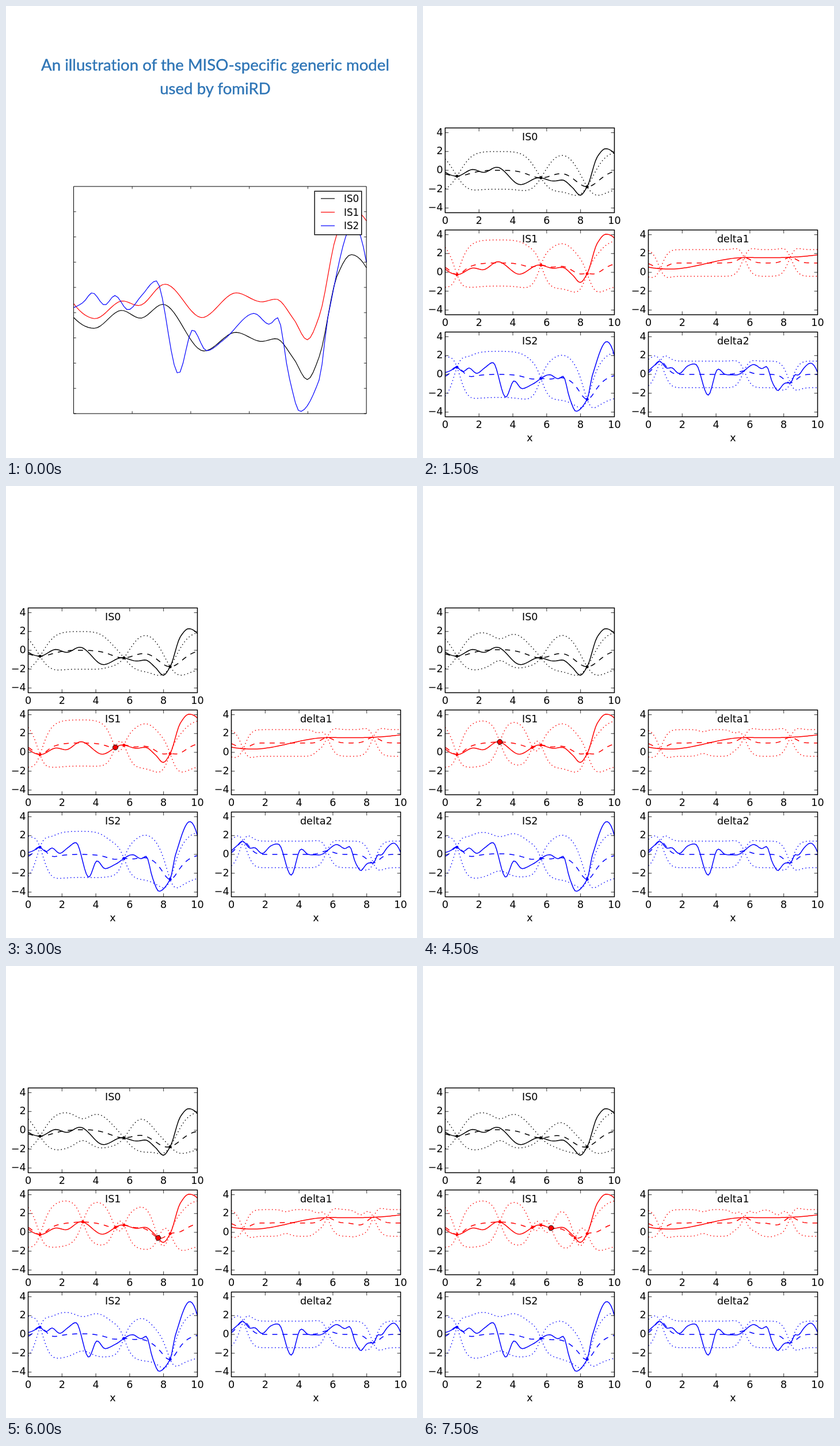
An HTML page that plays this animation: 714x784 px, repeating every 8 s.

```html
<!DOCTYPE html>
<html lang="en">
<head>
<meta charset="utf-8">
<title>Multi-source model</title>
<style>
  html, body { margin: 0; width: 100%; height: 100%; overflow: hidden; background: #fff; }
  svg { display: block; width: 100vw; height: 100vh; }
  text { font: 17.6px "DejaVu Sans", sans-serif; }
  .title { font: 27.65px Lato, sans-serif; font-variant-ligatures: none; fill: #2e75b6; stroke: #2e75b6; stroke-width: .4px; }
  .legend { font-size: 16.8px; }
</style>
</head>
<body>
<svg id="stage" viewBox="0 0 714 784"></svg>
<script>
const LOOP = 8000, STEP = 1500, SAMPLES = 100;
const COLORS = ['#000', '#f00', '#00f'];
const xs = Array.from({ length: SAMPLES }, (_, i) => i * 10 / (SAMPLES - 1));

// Curve eased through x,y key points: flat at turning points, parabolic at the ends.
function eased(...p) {
  const n = p.length / 2, x = i => p[2 * i], y = i => p[2 * i + 1];
  const sec = i => (y(i + 1) - y(i)) / (x(i + 1) - x(i));
  const slope = i => {
    if (i === 0) return 2 * sec(0) - slope(1);
    if (i === n - 1) return 2 * sec(n - 2) - slope(n - 2);
    const a = sec(i - 1), b = sec(i);
    return a * b > 0 ? 2 * a * b / (a + b) : 0;
  };
  return v => {
    let i = 0;
    while (i < n - 2 && v > x(i + 1)) i++;
    const h = x(i + 1) - x(i), t = (v - x(i)) / h, u = 1 - t;
    return u * u * (1 + 2 * t) * y(i) + t * t * (3 - 2 * t) * y(i + 1)
      + h * t * u * (u * slope(i) - t * slope(i + 1));
  };
}

const truth0 = eased(0,-.19, .7,-.62, 1.64,.09, 2.28,-.22, 3.05,.33, 4.45,-1.52, 5.54,-.78,
  6.42,-1.14, 6.91,-1.03, 7.52,-1.83, 7.98,-2.65, 8.39,-1.74, 9,1.46, 9.48,2.3, 10,1.78);
const truth2 = eased(0,.2, .33,.41, .64,.79, 1.06,.3, 1.41,.68, 1.86,.11, 2.33,.69, 2.82,1.26,
  3.58,-2.42, 4.07,-.68, 4.54,-1.51, 5.14,-1.06, 6.17,-.03, 6.68,-.46, 6.97,-.2, 7.36,-2.55,
  7.73,-3.92, 8.39,-2.65, 8.7,-.09, 9.55,3.49, 10,2);
const shift1 = eased(0,.55, 1.25,.345, 5.7,1.57, 7.5,1.565, 10,1.86);

const truth = [truth0, x => truth0(x) + shift1(x), truth2];
const shift = [null, shift1, x => truth2(x) - truth0(x)];

// Axes map data units to stage pixels.
function axes(left, top, width, height, min, max) {
  return {
    left, top, width, height, min, max,
    X: x => left + x / 10 * width,
    Y: y => top + (max - y) / (max - min) * height
  };
}

const big = axes(117.5, 313, 508.6, 394, -4, 5);
const panel = (left, top) => axes(left, top, 294, 147, -4.5, 4.5);

// Gaussian process: a shared base plus an independent shift for each source.
const kBase = (a, b) => Math.exp(-((a - b) ** 2));
const kShift = (a, b) => .5 * Math.exp(-4 * (a - b) ** 2);
const priorMean = [0, 1, 0];
const dot = (a, b) => a.reduce((s, v, i) => s + v * b[i], 0);

function invert(m) {
  const n = m.length;
  const a = m.map((r, i) => [...r, ...r.map((_, j) => +(i === j))]);
  for (let c = 0; c < n; c++) {
    const d = a[c][c];
    a[c] = a[c].map(v => v / d);
    for (let r = 0; r < n; r++) {
      if (r === c) continue;
      const f = a[r][c];
      a[r] = a[r].map((v, j) => v - f * a[c][j]);
    }
  }
  return a.map(r => r.slice(n));
}

function cov(base, src, x, o) {
  return (base ? kBase(x, o.x) : 0) + (src && src === o.src ? kShift(x, o.x) : 0);
}

function fit(obs) {
  const inv = invert(obs.map((a, i) => obs.map((b, j) => cov(true, a.src, a.x, b) + (i === j ? 1e-6 : 0))));
  const weights = inv.map(r => dot(r, obs.map(o => truth[o.src](o.x) - priorMean[o.src])));
  return (base, src) => xs.map(x => {
    const c = obs.map(o => cov(base, src, x, o));
    const prior = (base ? 1 : 0) + (src ? .5 : 0);
    const variance = prior - dot(c, inv.map(r => dot(r, c)));
    return { mean: priorMean[src] + dot(c, weights), half: 2 * Math.sqrt(Math.max(0, variance)) };
  });
}

// Drawing helpers return SVG markup.
const label = (x, y, s, anchor = 'middle', cls = '') =>
  `<text x="${x}" y="${y}" text-anchor="${anchor}" class="${cls}">${s}</text>`;

const stroke = (d, color, width, dash = 'none') =>
  `<path d="${d}" fill="none" stroke="${color}" stroke-width="${width}" stroke-dasharray="${dash}" stroke-linejoin="round"/>`;

const line = (ax, ys, color, width, dash) =>
  stroke('M' + ys.map((y, i) => ax.X(xs[i]).toFixed(2) + ' ' + ax.Y(y).toFixed(2)).join('L'), color, width, dash);

const circle = (x, y, r, fill, edge) =>
  `<circle cx="${x}" cy="${y}" r="${r}" fill="${fill}" stroke="${edge}"/>`;

function frame(ax, yStep, tick, width) {
  const { left: l, top: t, width: w, height: h } = ax;
  let d = '';
  for (let x = 2; x < 10; x += 2) d += `M${ax.X(x)} ${t}v${tick}M${ax.X(x)} ${t + h}v${-tick}`;
  for (let y = -4; y < ax.max; y += yStep)
    d += `M${l} ${ax.Y(y)}h${tick}M${l + w} ${ax.Y(y)}h${-tick}`;
  return stroke(d, '#000', .8) + stroke(`M${l} ${t}h${w}v${h}h${-w}z`, '#000', width);
}

function tickLabels(ax) {
  let s = '';
  for (let x = 0; x <= 10; x += 2) s += label(ax.X(x), ax.top + ax.height + 19.2, x);
  for (let y = -4; y <= 4; y += 2)
    s += label(ax.left - 3.7, ax.Y(y) + 5.1, y < 0 ? '\u2212' + -y : y, 'end');
  return s;
}

function intro() {
  let s = label(363.5, 112, 'An illustration of the MISO-specific generic model', 'middle', 'title')
    + label(363.5, 152.5, 'used by fomiRD', 'middle', 'title');
  truth.forEach((f, i) => s += line(big, xs.map(f), COLORS[i], 1.2));
  s += frame(big, 1, 4.3, 1);
  s += '<rect x="536.1" y="321.3" width="81.6" height="75.4" fill="#fff" stroke="#000" stroke-width="1.4"/>';
  COLORS.forEach((c, i) => {
    const y = 334 + i * 23.6;
    s += stroke(`M547 ${y}h24`, c, 1.2) + label(587, y + 6.2, 'IS' + i, 'start', 'legend');
  });
  return s;
}

function plot(ax, name, color, f, post) {
  const w = 1.5, dots = '1.47 4.41';
  return line(ax, xs.map(f), color, w)
    + line(ax, post.map(p => p.mean), color, w, '8.8 8.8')
    + line(ax, post.map(p => p.mean + p.half), color, w, dots)
    + line(ax, post.map(p => p.mean - p.half), color, w, dots)
    + frame(ax, 2, 5.9, 1.5) + tickLabels(ax)
    + label(ax.left + ax.width / 2 + .3, ax.top + 21.9, name);
}

const start = [.7, 5.66, 8.39].flatMap(x => [0, 1, 2].map(src => ({ x, src })));
const added = [5.15, 3.23, 7.68, 6.26].map(x => ({ x, src: 1 }));

function model(count) {
  const obs = [...start, ...added.slice(0, count)];
  const post = fit(obs);
  let s = '';
  for (let i = 0; i < 3; i++) {
    const top = 211.5 + 177 * i, ax = panel(38.5, top);
    s += plot(ax, 'IS' + i, COLORS[i], truth[i], post(true, i));
    if (i) s += plot(panel(391.5, top), 'delta' + i, COLORS[i], shift[i], post(false, i));
    obs.forEach((o, j) => {
      if (o.src !== i) return;
      const latest = count > 0 && j === obs.length - 1;
      s += circle(ax.X(o.x), ax.Y(truth[i](o.x)), latest ? 4.4 : 2.5, COLORS[i], latest ? '#000' : 'none');
    });
  }
  return s + label(185.5, 755.3, 'x') + label(538.5, 755.3, 'x');
}

const stage = document.getElementById('stage');
const scenes = [intro(), ...[0, 1, 2, 3, 4].map(model)];
const t0 = performance.now();
let shown = -1;

function render(now) {
  const t = Math.max(0, now - t0) % LOOP, i = Math.floor(t / STEP);
  if (i !== shown) stage.innerHTML = scenes[shown = i];
  requestAnimationFrame(render);
}
render(t0);
</script>
</body>
</html>
```
